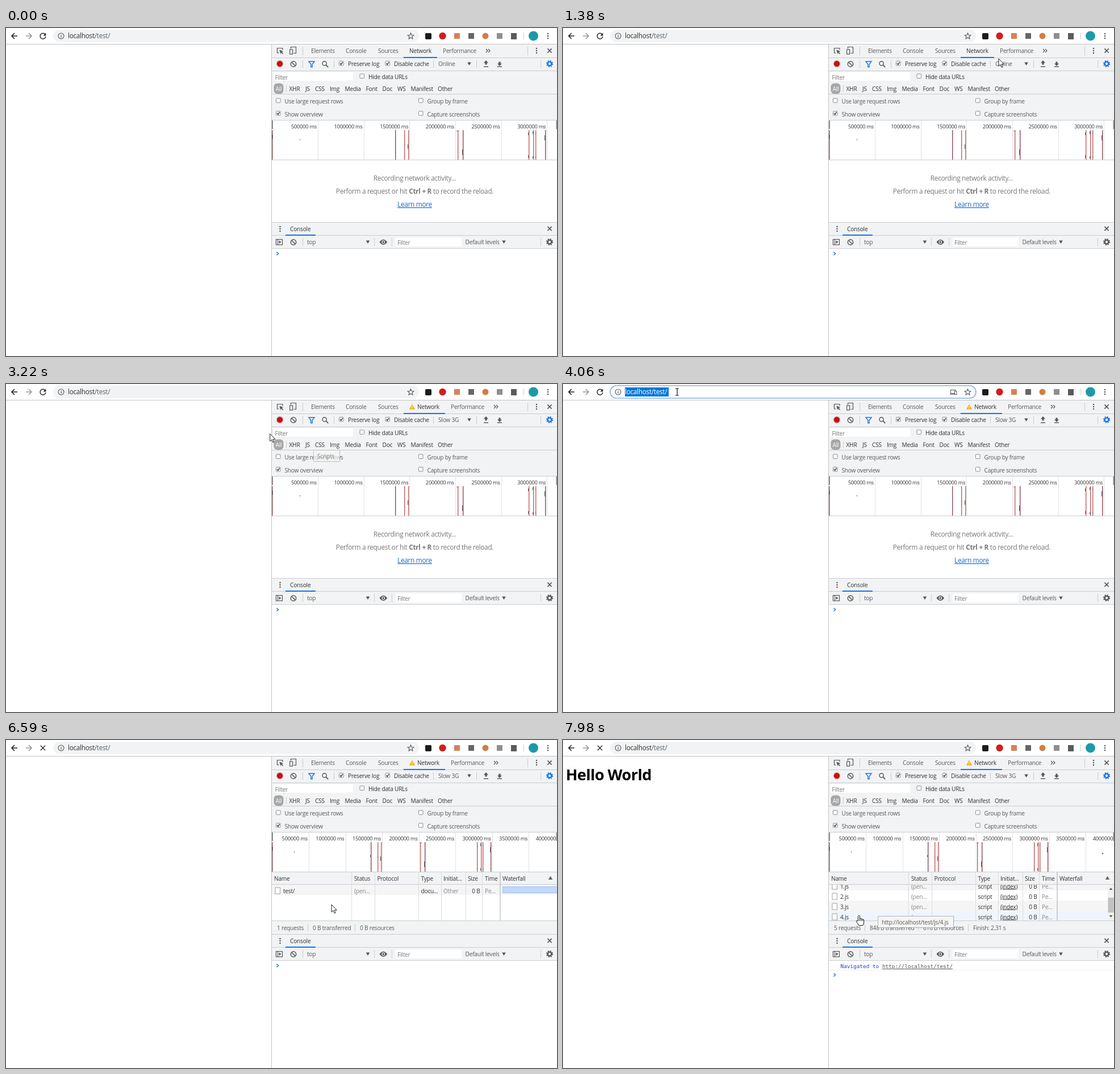
An HTML page that plays this animation: 970 by 578 pixels, repeating every 8000 ms.

```html
<!DOCTYPE html>
<html lang="en">
<head>
<meta charset="utf-8">
<title>Network panel</title>
<style>
  html, body { margin: 0; width: 100%; height: 100%; overflow: hidden; background: #fff; }
  svg { display: block; width: 100vw; height: 100vh; }
  text { font: 10.2px "Open Sans", "Noto Sans", sans-serif; letter-spacing: -.025em; fill: #333; white-space: pre; }
  .e { text-anchor: end; }
  .m { text-anchor: middle; }
  .tab { fill: #5a5a5a; }
  .g { fill: #888; }
  .w { fill: #fff; }
  .u { text-decoration: underline; }
  .tick { font-size: 9.25px; }
  .big { font-size: 11.8px; }
  .msg { fill: #777; }
  .link { fill: #1967c8; text-decoration: underline; }
  .b { font-weight: 700; }
  .h1 { font-size: 27px; font-weight: 700; letter-spacing: -.02em; fill: #000; }
  .mono { font: 9.4px "DejaVu Sans Mono", monospace; letter-spacing: 0; fill: #1a3fd0; }
</style>
</head>
<body>
<svg id="stage" viewBox="0 0 970 578"></svg>
<script>
const LOOP = 8000, BG = '#f1f3f4', EDGE = '#cacdd1', BLUE = '#1a73e8', INK = '#5f6368', ICON = '#555';

const text = (x, y, s, cls = '') => `<text x="${x}" y="${y}" class="${cls}">${s}</text>`;
const rect = (x, y, w, h, fill, more = '') => `<rect x="${x}" y="${y}" width="${w}" height="${h}" fill="${fill}" ${more}/>`;
const path = (d, color, width = 1.3, fill = 'none') => `<path d="${d}" stroke="${color}" stroke-width="${width}" fill="${fill}"/>`;
const solid = (d, fill) => `<path d="${d}" fill="${fill}"/>`;
const disc = (x, y, r, fill, more = '') => `<circle cx="${x}" cy="${y}" r="${r}" fill="${fill}" ${more}/>`;
const ring = (x, y, r, color, width = 1.3, more = '') => disc(x, y, r, 'none', `stroke="${color}" stroke-width="${width}" ${more}`);
const group = (id, ...parts) => `<g id="${id}">${parts.join('')}</g>`;
const hline = (y, x = 468, w = 502, color = EDGE) => rect(x, y, w, 1, color);
const vline = (x, y, h, color = EDGE) => rect(x, y, 1, h, color);

// Small interface icons
const dots = (x, y) => [-4, 0, 4].map(d => disc(x, y + d, 1.25, ICON)).join('');
const cross = (x, y, r = 3.6, color = ICON) =>
  path(`M${x - r} ${y - r}l${2 * r} ${2 * r}m0 ${-2 * r}l${-2 * r} ${2 * r}`, color, 1.5);
const ban = (x, y) => ring(x, y, 4.7, ICON, 1.5) + path(`M${x - 3.3} ${y - 3.3}l6.6 6.6`, ICON, 1.5);
const gear = (x, y, c) => ring(x, y, 5.1, c, 2, 'stroke-dasharray="2 2.005"') + ring(x, y, 3.4, c, 2.4);
const down = (x, y) => solid(`M${x - 3.3} ${y - 2.6}h6.6l-3.3 5.6z`, ICON);
const check = (x, y, on) => rect(x + .5, y + .5, 7.5, 7.5, '#fff', 'rx="1" stroke="#808080" stroke-width=".9"') +
  (on ? path(`M${x + 2} ${y + 4.4}l1.7 1.9 3-4.2`, '#333', 1.4) : '');
const arrow = (x, dir, c) =>
  path(`M${x - 5 * dir} 14H${x + 5 * dir}M${x} 9L${x + 5 * dir} 14L${x} 19`, c, 1.6);
const transfer = (x, dir) =>
  solid(`M${x} ${62 - 5 * dir}l4 ${4.6 * dir}h-2.4v${3 * dir}h-3.2v${-3 * dir}h-2.4z`, ICON) + rect(x - 4, 67.5, 8, 1.4, ICON);

function browserBar() {
  return rect(0, 0, 970, 28, '#fff') + hline(28, 0, 970, '#c2c2c2') +
    arrow(15, -1, '#222') + arrow(40, 1, '#999') +
    group('reload', path('M68.8 10.9A5 5 0 1 0 70 15', '#222', 1.5), solid('M70.4 8.6v4.8h-4.8z', '#222')) +
    group('stop', cross(65, 14, 4.2, '#333')) +
    group('pill', rect(83, 3, 644, 22, BG, 'rx="11"')) +
    group('pillFocus', rect(83, 3, 644, 22, '#fff', 'rx="11" stroke="#86aee8" stroke-width="1.6"'),
      rect(682.5, 10.5, 8, 6, 'none', 'stroke="#555"'), rect(681, 17.5, 8, 1.2, ICON),
      rect(689.5, 12.5, 3.5, 6, '#fff', 'stroke="#555"')) +
    ring(97, 14, 5, INK, 1.2) + rect(96.4, 13.2, 1.3, 3.6, INK) + rect(96.4, 11, 1.3, 1.3, INK) +
    group('selection', rect(109, 6, 77, 16, '#0078d7'), text(109, 18, 'localhost/test/', 'big w')) +
    group('address', text(109, 18, 'localhost<tspan fill="#5f6368">/test/</tspan>', 'big')) +
    group('caret', rect(185, 6, 1, 14, '#000')) +
    path('M712.5 8.9l1.5 3.6 3.9.3-3 2.5 1 3.8-3.4-2.1-3.4 2.1 1-3.8-3-2.5 3.9-.3z', ICON, 1.1) +
    rect(738, 9, 11, 11, '#1c1c1c', 'rx="2"') + disc(768.5, 14, 6.2, '#d21f1f') +
    rect(789, 9, 10, 10, '#d9805a') + rect(814, 9, 10, 10, '#666') + disc(844, 14, 5.5, '#cf7f45') +
    rect(864, 9, 10, 10, '#8f8f8f') + rect(889, 9, 10, 11, '#5a5a5a') +
    vline(911, 8, 12) + disc(928.5, 14, 8.5, '#1d9aa8') + dots(954, 14);
}

function tabs() {
  const tail = dx => text(769 + dx, 44, 'Performance', 'tab') +
    path(`M${845 + dx} 37l3 3-3 3m4-6l3 3-3 3`, ICON, 1.2);
  return rect(468, 29, 502, 23, BG) + hline(52) +
    path('M487 38.5v-3h-9.5v8.5h3', ICON, 1.2) +
    solid('M481.5 38.5l6.8 2.7-2.7 1 2.7 2.7-1.2 1.2-2.7-2.7-1.1 2.6z', ICON) +
    path('M501.5 36.5v-3h9v11h-4', ICON, 1.2) + rect(499.6, 38, 5, 8, BG, 'stroke="#555" stroke-width="1.2"') +
    vline(522, 33, 15) +
    text(537, 44, 'Elements', 'tab') + text(598, 44, 'Console', 'tab') + text(655, 44, 'Sources', 'tab') +
    group('tabPlain', text(710, 44, 'Network'), rect(700, 51, 59, 2, BLUE), tail(0)) +
    group('tabWarn', solid('M715 35.5l5.2 9.3h-10.4z', '#f4b400'), rect(714.5, 38.8, 1.1, 3, '#fff'),
      rect(714.5, 42.6, 1.1, 1.1, '#fff'), text(724, 44, 'Network'), rect(700, 51, 73, 2, BLUE), tail(14)) +
    vline(918, 33, 15) + dots(934, 40) + cross(957, 40);
}

function tools() {
  const types = [[498.5, 'XHR'], [527, 'JS'], [544, 'CSS'], [570, 'Img'], [596.5, 'Media'], [633.5, 'Font'],
    [662.5, 'Doc'], [689, 'WS'], [712.5, 'Manifest'], [760, 'Other']];
  return rect(468, 53, 502, 110, BG) + [75, 116, 162].map(y => hline(y)).join('') +
    disc(482, 63, 6.8, '#f3c9c9') + disc(482, 63, 5.2, '#c01414') + ban(506, 63.5) +
    [522, 577, 752, 828, 941].map(x => vline(x, 57, 13)).join('') +
    path('M533 59h10l-3.8 4.8v5h-2.4v-5z', BLUE, 1.4) +
    ring(560.6, 62.4, 3.6, ICON, 1.4) + path('M563.3 65.2l3.9 4', ICON, 1.7) +
    check(586, 58, true) + text(602, 67, 'Preserve log') + check(667.5, 58, true) + text(683, 67, 'Disable cache') +
    group('online', text(761, 67, 'Online', 'tab')) + group('slow', text(761, 67, 'Slow 3G', 'tab')) +
    down(815.5, 63) + transfer(845, 1) + transfer(869, -1) + gear(957, 63, BLUE) +
    rect(471, 78, 140, 15, '#fff') + text(473.5, 90.5, 'Filter', 'msg') +
    check(622.5, 80.5) + text(638, 90, 'Hide data URLs') +
    rect(471.5, 97.5, 17, 18.5, '#a6a6a6', 'rx="6"') + text(480, 111, 'All', 'm w') + vline(493, 101, 12) +
    types.map(([x, s]) => text(x, 111, s)).join('') +
    check(475, 123.5) + text(490.5, 133, 'Use large request rows', 'tab') +
    check(726, 123.5) + text(741.5, 133, 'Group by frame', 'tab') +
    check(475, 146, true) + text(490.5, 155.5, 'Show overview', 'tab') +
    check(726, 146) + text(741.5, 155.5, 'Capture screenshots', 'tab');
}

function overview(id, step) {
  const at = x => Math.round(468.4 + (x - 468.4) * step / 80.65 - .5);
  const marks = [685.5, 701, 708, 795, 804, 920, 928, 932, 949];
  const specks = [[685, 203, 3], [701, 205, 3], [707, 205, 8], [803, 214, 10], [919.5, 184, 5], [919.5, 224, 5],
    [927, 182, 5], [927, 226, 4], [932, 183, 5], [932, 225, 5], [948.5, 189, 9], [517.5, 196, 2]];
  let s = '';
  for (let i = 1; i < 9; i++) {
    const x = 468.4 + step * i;
    s += vline(Math.round(x), 163, 69, '#e2e2e2') + text(x - 2, 176.5, i * 500000 + ' ms', 'e tick');
  }
  marks.forEach((x, i) => s += rect(at(x), 180, 1.4, 52, i % 4 ? '#c0605f' : '#8b4a58'));
  s += rect(at(794.5) - 1, 181, 4, 1, '#d46a60');
  specks.forEach(([x, y, h]) => s += vline(at(x), y, h, '#5d6870'));
  return group(id, s);
}

function row(i, fill, [name, status, proto, type, init, size, time]) {
  const y = 256 + 18 * i, base = y + 13.5;
  return rect(468, y - 1, 502, 18, fill, `class="row"`) +
    rect(474, y + 4, 8.5, 11, '#fff', 'stroke="#999" stroke-width=".9"') +
    text(488, base, name) + text(613, base, status, 'g') + text(653, base, proto) + text(730.5, base, type) +
    text(770, base, init, type === 'script' ? 'u' : 'g') + text(834.5, base, size, 'e') + text(843, base, time, 'g');
}

function requests() {
  const heads = [[472, 'Name'], [613, 'Status'], [653.5, 'Protocol'], [730.5, 'Type'], [770, 'Initiat...'],
    [813, 'Size'], [843, 'Time'], [874, 'Waterfall']];
  const cols = [608, 649, 726, 766, 809, 838];
  const summary = parts => parts.map(([x, s], i) => text(x, 335, s, 'tab') + (i ? vline(x - 9, 324, 13) : '')).join('');
  const scripts = [1, 2, 3, 4].map(n =>
    row(n, n % 2 ? '#f5f5f5' : '#fff', [n + '.js', '(pen...', '', 'script', '(index)', '0 B', 'Pe...'])).join('');
  const bar = w => rect(874.5, 258.5, w, 11, '#bfd8fd', 'stroke="#a3c3f2"');
  return group('table',
    rect(468, 233, 502, 109, '#fff'),
    '<clipPath id="view"><rect x="468" y="255" width="502" height="63"/></clipPath><g clip-path="url(#view)">',
    group('pending', row(0, '#f5f5f5', ['test/', '(pen...', '', 'docu...', 'Other', '0 B', 'Pe...']), bar(100)),
    group('loadedRows', row(0, '#fff', ['test/', '200', 'http/1.1', 'docu...', 'Other', '848 B', '2.0...']), scripts, bar(72)),
    '</g>',
    rect(468, 233, 502, 22, BG), hline(254), heads.map(([x, s]) => text(x, 248, s)).join(''),
    solid('M954.8 246h7.4l-3.7-6.2z', '#666'),
    cols.map(x => vline(x, 233, 85, '#dcdcdc')).join(''), vline(869.5, 233, 85, '#aaa'),
    group('scrollbar', rect(959, 255, 11, 63, '#f1f1f1'), group('thumb', rect(959.5, 278, 10, 26, '#c1c1c1')),
      solid('M961.5 264h6l-3-3.5zM961.5 309h6l-3 3.5z', ICON)),
    rect(468, 318, 502, 24, BG), hline(318),
    group('sumPending', summary([[477, '1 requests'], [540, '0 B transferred'], [623, '0 B resources']])),
    group('sumLoaded', summary([[477, '5 requests'], [540, '848 B transferred'], [634, '610 B resources'], [722, 'Finish: 2.31 s']])));
}

function drawer() {
  const prompt = y => path(`M476.5 ${y - 2.8}l3.2 2.8-3.2 2.8`, BLUE, 1.4);
  return rect(468, 342, 502, 46, BG) + [342, 365, 388].map(y => hline(y)).join('') +
    dots(482.5, 354) + text(500, 357.5, 'Console') + rect(492, 364, 53, 2, BLUE) + cross(957, 353.5) +
    rect(475.5, 372.5, 11, 9.5, 'none', 'stroke="#555" stroke-width="1.2"') + vline(478, 372, 10, ICON) +
    solid('M480.5 374.5v5.5l4-2.7z', ICON) +
    ban(506, 377.5) + text(530, 381, 'top', 'tab') + down(637, 377) +
    [522, 648, 679, 941].map(x => vline(x, 370, 14)).join('') +
    solid('M657.5 377.2q6.8-9 13.6 0q-6.8 9-13.6 0z', ICON) + disc(664.3, 377.2, 2.9, BG) + disc(664.3, 377.2, 1.7, ICON) +
    rect(686, 369, 116, 16, '#fff') + text(689, 381.5, 'Filter', 'msg') +
    text(808.5, 381, 'Default levels', 'tab') + down(876.5, 377) + gear(957, 377, ICON) +
    group('promptTop', prompt(397.5)) +
    group('navigated', text(488.5, 402, 'Navigated to <tspan class="u" fill="#555">http://localhost/test/</tspan>', 'mono'),
      hline(405, 468, 502, '#f0f0f0'), prompt(414));
}

function overlays() {
  const list = ['Online', 'Presets', 'Fast 3G', 'Slow 3G', 'Offline', 'Custom', 'Add...'];
  const tip = (id, x, y, w, h, s) => group(id,
    rect(x + 1.5, y + 1.5, w, h, '#000', 'opacity=".12"'),
    rect(x + .5, y + .5, w, h, '#f5f5f5', 'stroke="#b5b5b5"'), text(x + 7, y + h / 2 + 4.5, s, 'tab'));
  return group('popup', rect(757.5, 70.5, 83, 90, '#fff', 'stroke="#8a8a8a"'), rect(758, 110, 82, 13, '#1e90ff'),
      list.map((s, i) => text(i % 4 === 1 || !i ? 761 : 769, 81 + 13 * i, s, i === 3 ? 'w' : i % 4 === 1 ? 'b' : '')).join('')) +
    tip('scriptsTip', 541, 116, 46, 20, 'Scripts') +
    tip('urlTip', 554, 310, 133, 20, 'http://localhost/test/js/4.js') +
    group('pointer',
      group('arrowCur', path('M0 0V13.2l3-2.7 2.1 4.8 2.1-.9-2.1-4.7h4.2z', '#222', 1, '#fff')),
      group('beamCur', path('M-3 -6h2.2l.8.6.8-.6H3M-3 6h2.2l.8-.6.8.6H3M0 -5.5V5.5', '#111', 1.2)),
      group('handCur', path('M-1.5 10V1.2Q0-.8 1.5 1.2V6q1.5-1 2.7.4q1.5-.7 2.5.6q1.8-.4 2 1.5v4q-.2 2.5-1.7 5.2H-.5' +
        'q-1-2.7-3.6-5.9q-1.3-2.3.4-2.9q1.2-.2 2.2 1.4zM1.5 6v4M4.2 6.5V10M6.7 7v3', '#111', 1, '#fff')));
}

const stage = document.getElementById('stage');
stage.innerHTML = rect(0, 0, 970, 578, '#fff') + browserBar() +
  group('page', text(5, 71, 'Hello World', 'h1')) +
  tools() + tabs() +
  overview('overviewShort', 80.65) + overview('overviewLong', 64.55) +
  group('newSpeck', rect(949, 199, 2, 2, '#5d6870')) +
  rect(468, 180, 1.6, 52, '#8d6468') + rect(468, 188, 1.6, 7, '#45505a') +
  rect(468, 163, 2, 15, '#888') + rect(968.5, 163, 1.5, 15, '#888') +
  group('empty', rect(468, 233, 502, 109, '#fff'),
    text(719.5, 268.5, 'Recording network activity...', 'big msg m'),
    text(719.5, 292, 'Perform a request or hit <tspan class="b">Ctrl + R</tspan> to record the reload.', 'big msg m'),
    text(719.5, 315, 'Learn more', 'big link m')) +
  requests() + hline(232) + drawer() + vline(467, 29, 549, '#c4c4c4') + overlays();

const el = id => document.getElementById(id);
const lastRow = [...document.querySelectorAll('.row')].pop();
const clamp = v => Math.max(0, Math.min(1, v));
const show = (id, on) => el(id).style.display = on ? '' : 'none';
const fade = (id, amount) => el(id).style.opacity = clamp(amount);
const move = (id, x, y) => el(id).setAttribute('transform', `translate(${x} ${y})`);

// Pointer track: time, x, y
const track = [[130, 897, 549], [500, 760, 270], [870, 603, 66], [950, 603, 66], [1130, 740, 50], [1250, 873, 42],
  [1380, 767, 54], [1510, 758, 55], [1690, 758, 55], [2000, 800, 95], [2430, 790, 169], [2910, 790, 169],
  [3100, 540, 109], [3220, 466, 88], [3400, 240, 22], [3500, 114, 14], [3600, 150, 14], [3780, 150, 14],
  [4060, 201, 14], [4240, 201, 14], [4340, 203, 14], [5390, 203, 14], [5480, 114, 14], [5700, 400, 160],
  [5900, 644, 293], [6050, 644, 290], [6400, 560, 281], [6590, 573, 290], [6690, 576, 291], [6920, 576, 291],
  [7300, 540, 300], [7720, 521, 309], [LOOP, 521, 309]];

function pointerAt(t) {
  const i = Math.max(1, track.findIndex(k => k[0] > t));
  const [t0, x0, y0] = track[i - 1], [t1, x1, y1] = track[i];
  const p = (t - t0) / (t1 - t0);
  return [x0 + (x1 - x0) * p, y0 + (y1 - y0) * p];
}

function draw(t) {
  const slow = t >= 2910, sent = t >= 4980, loaded = t >= 6920;
  const focus = t >= 3780 && !sent, selected = focus && t < 4240;
  show('tabPlain', !slow); show('tabWarn', slow);
  show('online', !slow); show('slow', slow);
  show('pill', !focus); show('pillFocus', focus);
  show('selection', selected); show('address', !selected);
  show('caret', t >= 4240 && t < 4750);
  show('reload', !sent); show('stop', sent);
  show('overviewShort', !sent); show('overviewLong', sent);
  show('empty', !sent); show('table', sent);
  for (const id of ['page', 'newSpeck', 'loadedRows', 'scrollbar', 'sumLoaded', 'navigated']) show(id, loaded);
  for (const id of ['pending', 'sumPending', 'promptTop']) show(id, !loaded);

  const scroll = clamp((t - 7300) / 150), hand = t > 7600;
  move('loadedRows', 0, -26 * scroll);
  move('thumb', 0, 12 * (scroll - 1));
  lastRow.setAttribute('fill', hand ? '#eff5fe' : '#fff');

  fade('popup', slow ? 0 : (t - 2530) / 100);
  fade('scriptsTip', t < 3130 ? 0 : (3340 - t) / 170);
  fade('urlTip', (t - 7770) / 200);

  const [x, y] = pointerAt(t), beam = y < 26 && x < 700;
  show('pointer', t >= 130);
  show('handCur', hand); show('beamCur', beam); show('arrowCur', !hand && !beam);
  move('pointer', x, y);
}

function tick() {
  draw(performance.now() % LOOP);
  requestAnimationFrame(tick);
}
tick();
</script>
</body>
</html>
```
